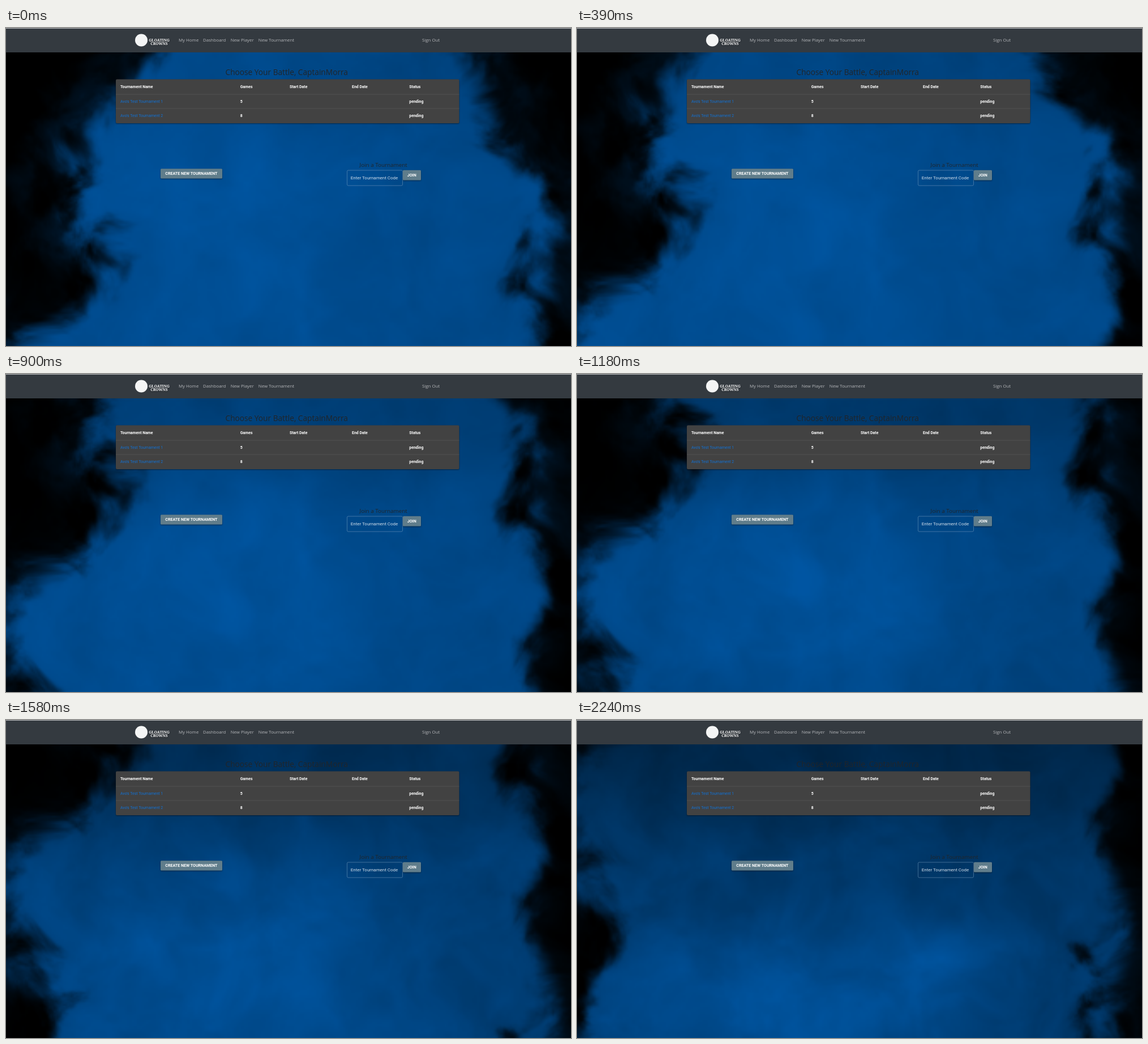
Write an HTML page with a canvas that moves like this. It is 998x561 px and loops after 2340 ms.

```html
<!DOCTYPE html>
<html lang="en">
<head>
<meta charset="utf-8">
<title>Tournament dashboard</title>
<style>
  html, body { margin: 0; width: 100%; height: 100%; overflow: hidden; background: #000; }
  canvas, svg { position: absolute; left: 0; width: 998px; }
  canvas { top: 43px; height: 518px; }
  svg { top: 0; height: 561px; }
  .nav, .head { font-family: "Open Sans", sans-serif; }
  .nav { font-size: 7.85px; fill: #b4b6b9; }
  .head { fill: #212529; }
  .ui { font-family: Roboto, sans-serif; font-size: 6.95px; }
  .bold { font-weight: 700; fill: #fff; }
  .link { fill: #1172d6; }
  .brand { font: 900 6.7px "Noto Serif", serif; fill: #fff; text-anchor: middle; }
  .shade { filter: drop-shadow(0 1px 1.2px rgba(0, 0, 0, .45)); }
</style>
</head>
<body>
<canvas id="smoke" width="333" height="173"></canvas>
<svg viewBox="0 0 998 561">
  <rect width="998" height="43" fill="#343a40"/>
  <rect width="998" height="1" fill="#b9bcbe"/>
  <circle cx="239" cy="21.5" r="11" fill="#f4f5f5"/>
  <g class="brand shade">
    <text x="270.5" y="23.6">GLOATING</text>
    <text x="270.5" y="30">CROWNS</text>
  </g>
  <g class="nav">
    <text x="305" y="24.4">My Home</text>
    <text x="348" y="24.4">Dashboard</text>
    <text x="396.7" y="24.4">New Player</text>
    <text x="445.8" y="24.4">New Tournament</text>
    <text x="735" y="24.4">Sign Out</text>
  </g>

  <text class="head" x="387.5" y="83.4" font-size="13.7">Choose Your Battle, CaptainMorra</text>
  <rect class="shade" x="194" y="90.5" width="606.5" height="77.5" rx="2" fill="#424242"/>
  <path d="M194 117H800.5M194 142H800.5" stroke="#555" stroke-width=".8"/>
  <g class="ui bold">
    <text x="202" y="105.7">Tournament Name</text>
    <text x="413.7" y="105.7">Games</text>
    <text x="501" y="105.7">Start Date</text>
    <text x="611" y="105.7">End Date</text>
    <text x="712.3" y="105.7">Status</text>
    <text x="413.7" y="132.2">5</text>
    <text x="712.3" y="132.2">pending</text>
    <text x="413.7" y="157.4">8</text>
    <text x="712.3" y="157.4">pending</text>
  </g>
  <g class="ui link">
    <text x="202" y="132.2">Avo's Test Tournament 1</text>
    <text x="202" y="157.4">Avo's Test Tournament 2</text>
  </g>

  <text class="head" x="624.5" y="244.6" font-size="9.85">Join a Tournament</text>
  <rect x="602.5" y="251" width="98" height="27" rx="2" fill="none" stroke="#7c9dbd" stroke-opacity=".65" stroke-width=".8"/>
  <text class="ui" x="608.8" y="266.7" style="font-size:7.95px" fill="#d3dfeb">Enter Tournament Code</text>
  <g class="shade" fill="#607d8b">
    <rect x="273" y="248.3" width="109" height="17.2" rx="1.5"/>
    <rect x="701" y="250.8" width="32" height="17.7" rx="1.5"/>
  </g>
  <g class="ui bold" text-anchor="middle" style="font-size:7.1px">
    <text x="327.4" y="259.4">CREATE NEW TOURNAMENT</text>
    <text x="716.7" y="262">JOIN</text>
  </g>
</svg>
<script>
const LOOP = 2340, RISE = 0.23, TOP = 43, HEIGHT = 518, CELL = 3;
const STEPS = [0, 120, 240, 390, 510, 630, 750, 900, 1030, 1180, 1320, 1450, 1580, 1730, 1860, 1980, 2110, 2240];

const mix = (a, b, k) => a + (b - a) * k;
const clamp = (v, lo, hi) => Math.max(lo, Math.min(hi, v));
const ease = k => k * k * (3 - 2 * k);
const smooth = (lo, hi, v) => ease(clamp((v - lo) / (hi - lo), 0, 1));
const wave = (v, peak, period) => Math.cos((v - peak) / period * 2 * Math.PI);
const blob = (dx, dy, rx, ry) => Math.exp(-((dx / rx) ** 2) - (dy / ry) ** 2);

// Parabola through the values at the top, middle and bottom of the stage
const arc = (top, mid, low, k) =>
  top * (1 - k) * (1 - 2 * k) + 4 * mid * k * (1 - k) + low * k * (2 * k - 1);

let seed = 71;
const lattice = Float32Array.from({ length: 65536 }, () => {
  seed = (Math.imul(seed, 1664525) + 1013904223) >>> 0;
  return seed / 4294967296;
});
const cell = (x, y) => lattice[(x & 255) | ((y & 255) << 8)];

function noise(x, y) {
  const ix = Math.floor(x), iy = Math.floor(y), u = ease(x - ix), v = ease(y - iy);
  return mix(mix(cell(ix, iy), cell(ix + 1, iy), u), mix(cell(ix, iy + 1), cell(ix + 1, iy + 1), u), v);
}

// Layered noise centred on zero
function fbm(x, y, octaves) {
  let sum = 0, gain = 0.5;
  for (let i = 0; i < octaves; i++, gain /= 2) {
    sum += gain * (noise(x, y) - 0.5);
    x = x * 2.03 + 17.3;
    y = y * 2.03 + 9.1;
  }
  return sum * 2;
}

const canvas = document.getElementById("smoke");
const ctx = canvas.getContext("2d");

function makeSmoke(t) {
  const image = ctx.createImageData(canvas.width, canvas.height), data = image.data;
  const age = t / LOOP, late = smooth(600, 2100, t), lift = RISE * t;
  const ambient = mix(0.9, 0.68, late);
  const glowY = mix(330, 510, late), glowW = mix(260, 350, late), glowH = mix(270, 150, late);
  const plume = 0.12 * smooth(1600, 1980, t), plumeY = 935 - lift;

  for (let row = 0, p = 0; row < canvas.height; row++) {
    const y = TOP + (row + 0.5) * CELL, flow = y + lift, k = (y - TOP) / HEIGHT;
    const left = arc(240 - 200 * age * age, 150 * (1 - age), 40, k) - 38 * wave(flow, 655, 436);
    const right = arc(800 + 155 * age, 935, 930, k) - 22 * wave(flow, 700, 265);
    const shade = 1 - mix(0.06, 0.32, age) * smooth(290, TOP, y);

    for (let col = 0; col < canvas.width; col++, p += 4) {
      const x = (col + 0.5) * CELL;
      const wx = fbm(x / 130, flow / 130, 2), wy = fbm(x / 130 + 40, flow / 130 + 70, 2);
      const n = fbm(x / 75 + wx * 0.8, flow / 75 + wy * 0.8, 5);
      const depth = Math.min(x - left, right - x) + n * 85 + wx * 25;
      const core = smooth(-35, 50, depth);
      const haze = smooth(-150, 40, depth) * clamp(0.6 + 1.5 * n, 0, 1);
      const glow = blob(x - 390, y - glowY, glowW, glowH);
      const puff = plume * blob(x - 645, y - plumeY, 75, 65);
      const level = ambient + (0.98 - ambient) * glow + puff + n * mix(0.08, 0.14, late);
      const tone = (level - 0.04 * smooth(430, 850, x)) * shade;
      const v = clamp(tone * mix(0.3 * haze, 1, core), 0, 1.03);
      data[p + 1] = 83 * v;
      data[p + 2] = 157 * v;
      data[p + 3] = 255;
    }
  }
  return image;
}

const cache = [];
let shown = -1;

function draw(time) {
  const step = STEPS.findLastIndex(at => at <= time % LOOP);
  if (step === shown) return;
  cache[step] ||= makeSmoke(STEPS[step]);
  ctx.putImageData(cache[step], 0, 0);
  shown = step;
}

draw(0);
const start = performance.now();
function tick() {
  draw(performance.now() - start);
  requestAnimationFrame(tick);
}
requestAnimationFrame(tick);
</script>
</body>
</html>
```
